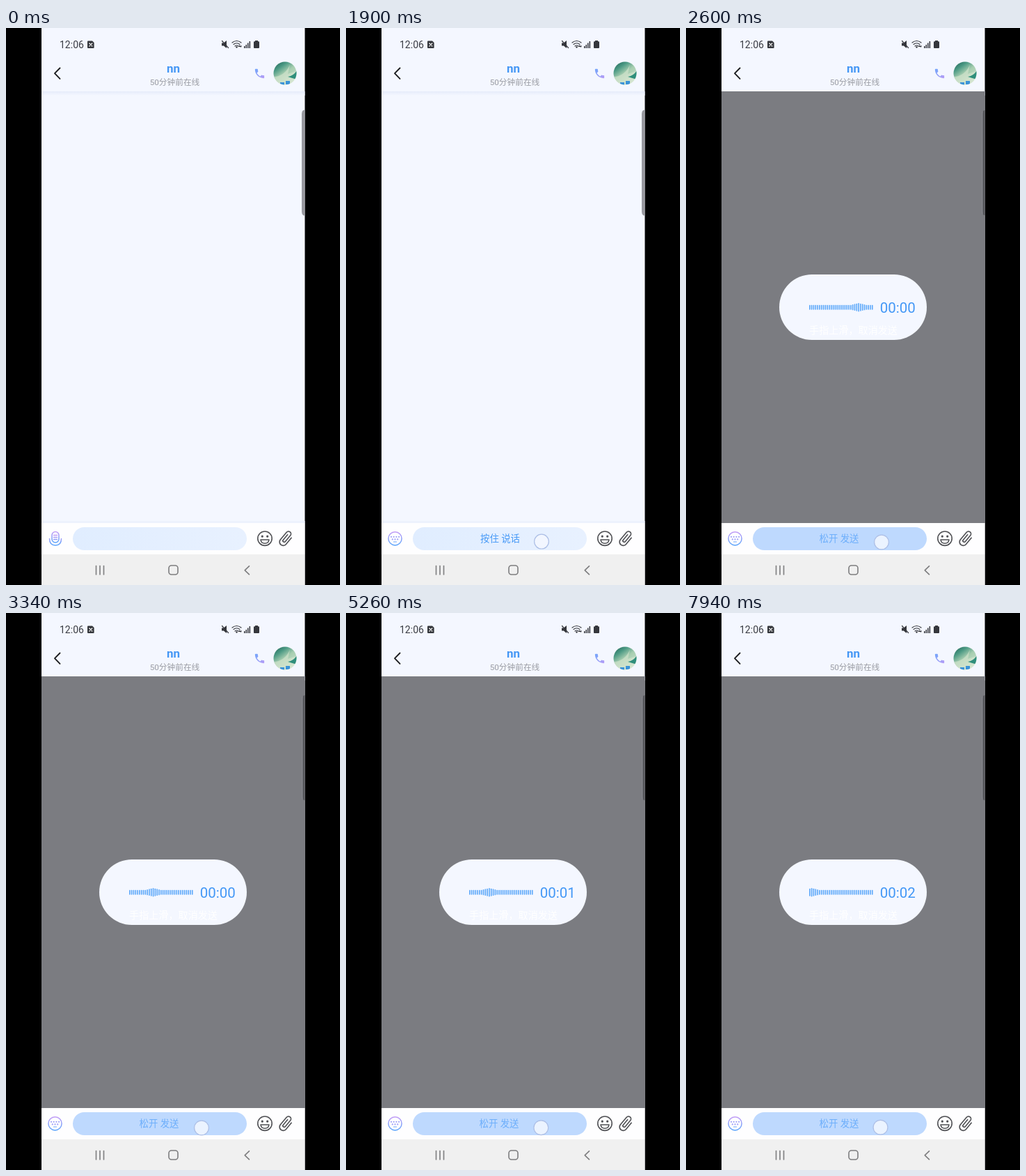
These frames come from a looping animation (480x800 px, 8000 ms). An HTML page:

```html
<!DOCTYPE html>
<html lang="zh">
<head>
<meta charset="utf-8">
<style>
  html, body { margin: 0; width: 100%; height: 100%; overflow: hidden; background: #000; }
  svg { display: block; width: 480px; height: 800px; }
  text { font-family: Roboto, "Noto Sans CJK SC", "Noto Sans CJK", sans-serif; }
  .mid { text-anchor: middle; }
  .line { fill: none; stroke-linecap: round; stroke-linejoin: round; }
</style>
</head>
<body>
<svg viewBox="0 0 480 800">
  <defs>
    <linearGradient id="tint" x1="0" y1="0" x2="0" y2="1">
      <stop stop-color="#c39cf6"/><stop offset="1" stop-color="#5aa4fb"/>
    </linearGradient>
    <linearGradient id="call" x1="0" y1="0" x2="1" y2="1">
      <stop stop-color="#72a5fb"/><stop offset="1" stop-color="#b79df6"/>
    </linearGradient>
    <linearGradient id="field">
      <stop stop-color="#e0edff"/><stop offset="1" stop-color="#e8f1ff"/>
    </linearGradient>
    <linearGradient id="shade" x1="0" y1="0" x2="0" y2="1">
      <stop stop-color="#e6ecfa"/><stop offset="1" stop-color="#f4f7ff"/>
    </linearGradient>
    <linearGradient id="photo" x1="0" y1="0" x2=".7" y2="1">
      <stop stop-color="#17594f"/><stop offset=".3" stop-color="#4c9a84"/>
      <stop offset=".55" stop-color="#a6cdb0"/><stop offset="1" stop-color="#cfe3d0"/>
    </linearGradient>
    <clipPath id="round"><circle cx="401" cy="65" r="16.5"/></clipPath>
  </defs>

  <rect x="51" width="378.5" height="800" fill="#f4f7ff"/>

  <!-- status bar -->
  <text x="77" y="29" font-size="14" fill="#3b3d43">12:06</text>
  <g fill="#35373c">
    <path d="M118 18.5h6l2.6 2.6v7q0 1-1 1h-7.6q-1 0-1-1v-8.6q0-1 1-1z"/>
    <path class="line" d="M119.8 22l4 4m0-4l-4 4" stroke="#fff" stroke-width="1.2"/>
    <path d="M310 21.5h2.8l4.2-3.5v11l-4.2-3.5h-2.8z"/>
    <path class="line" d="M310.5 18.5l9 10" stroke="#35373c" stroke-width="1.2"/>
    <path class="line" d="M325 21q6.500-5 13 0M327 23.500q4.500-3.500 9 0M329 26q2.500-2 5 0" stroke="#35373c" stroke-width="1.2"/>
    <circle cx="331.500" cy="27.500" r="1.200"/>
    <path d="M334 27l1.500-2.500 1.500 2.500zM336 25.500h3l-1.500 2.500z"/>
    <path d="M342 26h1.500v3H342zM344.500 24h1.500v5h-1.500zM347 21.500h1.500v7.500H347zM349.600 19h1.500v10h-1.500z"/>
    <path d="M358 18h4v1.200h1q1 0 1 1V28q0 1-1 1h-6q-1 0-1-1v-7.800q0-1 1-1h1z"/>
  </g>

  <!-- chat header -->
  <path class="line" d="M77.500 57.500l-7.500 7.700 7.500 7.700" stroke="#1c1d20" stroke-width="1.900"/>
  <text class="mid" x="240.500" y="63.500" font-size="17" font-weight="700" fill="#4597f5">nn</text>
  <text class="mid" x="242.500" y="82" font-size="11.700" fill="#9a9ca3">50分钟前在线</text>
  <path transform="translate(355.600 56.600) scale(.74)" fill="url(#call)" d="M6.620 10.790c1.440 2.830 3.760 5.140 6.590 6.590l2.200-2.200c.27-.27.67-.36 1.020-.24 1.120.37 2.330.57 3.570.57.55 0 1 .45 1 1V20c0 .55-.45 1-1 1-9.390 0-17-7.610-17-17 0-.55.45-1 1-1h3.500c.55 0 1 .45 1 1 0 1.250.2 2.450.57 3.570.11.35.03.74-.25 1.020z"/>
  <g clip-path="url(#round)">
    <rect x="384" y="48" width="34" height="34" fill="url(#photo)"/>
    <path d="M384 70q16 0 24-17l-3 13 12-4v20h-33z" fill="#dcead3" opacity=".55"/>
    <path d="M405 70q8-1 13-9v13z" fill="#2f8e7c"/>
    <path d="M394 78h6v4h-6zM402 76h6v5h-6z" fill="#3b93d8"/>
  </g>
  <rect x="51" y="91" width="378.500" height="6" fill="url(#shade)"/>
  <path d="M429.500 117.500q-4.500 0-4.500 6v140q0 6 4.500 6z" fill="#99999f"/>

  <!-- recording panel -->
  <g id="panel">
    <rect x="51" y="91" width="378.500" height="620" fill="#7b7c81"/>
    <path d="M429.500 118q-3.500 0-3.500 6v139q0 6 3.500 6z" fill="#56575b"/>
    <path d="M426 120v147" stroke="#909197" stroke-width=".8"/>
    <rect x="134" y="354" width="212" height="94" rx="47" fill="#f4f7ff"/>
    <g id="bars" fill="#62abfa"></g>
    <text id="clock" x="278.700" y="409" font-size="20.500" fill="#4297f6"></text>
    <text class="mid" x="240.500" y="439" font-size="14.100" fill="#fff">手指上滑，取消发送</text>
  </g>

  <!-- input bar -->
  <rect id="edge" x="51" y="708" width="378.500" height="3" fill="#edf2fd"/>
  <rect x="51" y="711" width="378.500" height="45" fill="#fefeff"/>
  <rect id="input" x="96" y="717" width="250" height="33" rx="16.500"/>
  <text id="label" class="mid" y="738" font-size="13.400"></text>

  <g id="mic" class="line" stroke="url(#tint)" stroke-width="1.500">
    <rect x="66" y="723.500" width="10" height="15.500" rx="5"/>
    <path d="M62.500 733.500q0 9.500 8.500 9.500t8.500-9.500M68.500 728.500h5M68.500 731.500h5M68.500 734.500h5"/>
  </g>
  <g id="keys">
    <circle cx="70.500" cy="733.300" r="9.600" fill="none" stroke="url(#tint)" stroke-width="1.500"/>
    <g class="line" stroke="#9d9ff7" stroke-width="2.200">
      <path d="M65 730.800h12" stroke-dasharray="0 3.700"/>
      <path d="M66.800 734.400h8" stroke-dasharray="0 3.700"/>
    </g>
    <path class="line" d="M68.500 738h4" stroke="#6aa5fb" stroke-width="1.200"/>
  </g>

  <g class="line" stroke="#505155" stroke-width="1.600">
    <circle cx="372" cy="733.200" r="10.200"/>
    <path d="M366 735h12q-.8 5.300-6 5.300t-6-5.300z"/>
    <path d="M368.300 730v.2M375.700 730v.2" stroke-width="3.200"/>
  </g>
  <path transform="translate(402.300 733.500) rotate(40) scale(1.100) translate(-12.500 -12)" fill="#505155" d="M16.500 6v11.500c0 2.210-1.790 4-4 4s-4-1.790-4-4V5a2.500 2.500 0 0 1 5 0v10.500c0 .55-.45 1-1 1s-1-.45-1-1V6H10v9.500a2.500 2.500 0 0 0 5 0V5c0-2.210-1.790-4-4-4S7 2.790 7 5v12.500c0 3.040 2.460 5.500 5.500 5.500s5.500-2.460 5.500-5.500V6z"/>

  <!-- navigation bar -->
  <rect x="51" y="756" width="378.500" height="44" fill="#f0f0f0"/>
  <g class="line" stroke="#7d7d7f" stroke-width="1.600">
    <path d="M129.500 772.500v12.500M135 772.500v12.500M140.500 772.500v12.500"/>
    <rect x="234" y="772" width="13" height="13" rx="3.800"/>
    <path d="M349.500 772.800l-6.300 6 6.300 6"/>
  </g>

  <circle id="touch" r="10.400" fill="#f3f7ff" fill-opacity=".85" stroke="#adbfe6" stroke-width="1.200"/>
</svg>
<script>
const LOOP = 8000, TAP = 500, SWITCH = 920, PRESS = 1820, RECORD = 1920, SECOND = 2520;
const BARS = 33, PITCH = 2.81;
const $ = id => document.getElementById(id);
const show = (id, on) => $(id).style.display = on ? '' : 'none';
const set = (el, attrs) => { for (const k in attrs) el.setAttribute(k, attrs[k]); };

const bars = Array.from({ length: BARS }, (_, i) => {
  const bar = document.createElementNS('http://www.w3.org/2000/svg', 'rect');
  set(bar, { x: 177 + i * PITCH, width: 1.7, rx: .7 });
  return $('bars').appendChild(bar);
});

// Linear interpolation between [time, value] points
function at(points, t) {
  let k = 1;
  while (k < points.length - 1 && t > points[k][0]) k++;
  const [t0, a] = points[k - 1], [t1, b] = points[k];
  return a + (b - a) * Math.max(0, Math.min(1, (t - t0) / (t1 - t0)));
}

// The crest walks leftwards one bar at a time and re-enters on the right
const CREST = [[1920, 37], [3340, 12], [5260, -23], [6560, -44], [8000, -66]];
const TOUCH_X = [[3340, 281], [5260, 280.3], [6560, 279.5]];
const TOUCH_Y = [[1920, 737.6], [3340, 739.5], [5260, 739.3], [6560, 738.7]];

function draw(t) {
  const voice = t >= SWITCH, recording = t >= RECORD, pressed = t >= PRESS;
  show('mic', !voice);
  show('keys', voice);
  show('panel', recording);
  show('edge', !recording);
  show('touch', pressed || (t >= TAP && t < SWITCH - 20));
  set($('touch'), pressed ? { cx: at(TOUCH_X, t), cy: at(TOUCH_Y, t) } : { cx: 71, cy: 737 });
  set($('input'), { fill: recording ? '#bed9fe' : 'url(#field)' });
  set($('label'), { x: recording ? 220 : 221.5, fill: recording ? '#6caefb' : '#4699f7' });
  $('label').textContent = !voice ? '' : recording ? '松开 发送' : '按住 说话';
  if (!recording) return;

  $('clock').textContent = '00:0' + Math.floor((t - RECORD) / SECOND);
  const step = Math.round(at(CREST, t));
  const crest = step > BARS ? step : (step + 3 * BARS) % BARS;
  bars.forEach((bar, i) => {
    const h = 7 + Math.max(0, 5.5 - 1.4 * Math.abs(i - crest));
    set(bar, { y: 401.2 - h / 2, height: h });
  });
}

const start = performance.now();
function tick() {
  draw((performance.now() - start) % LOOP);
  requestAnimationFrame(tick);
}
tick();
</script>
</body>
</html>
```
